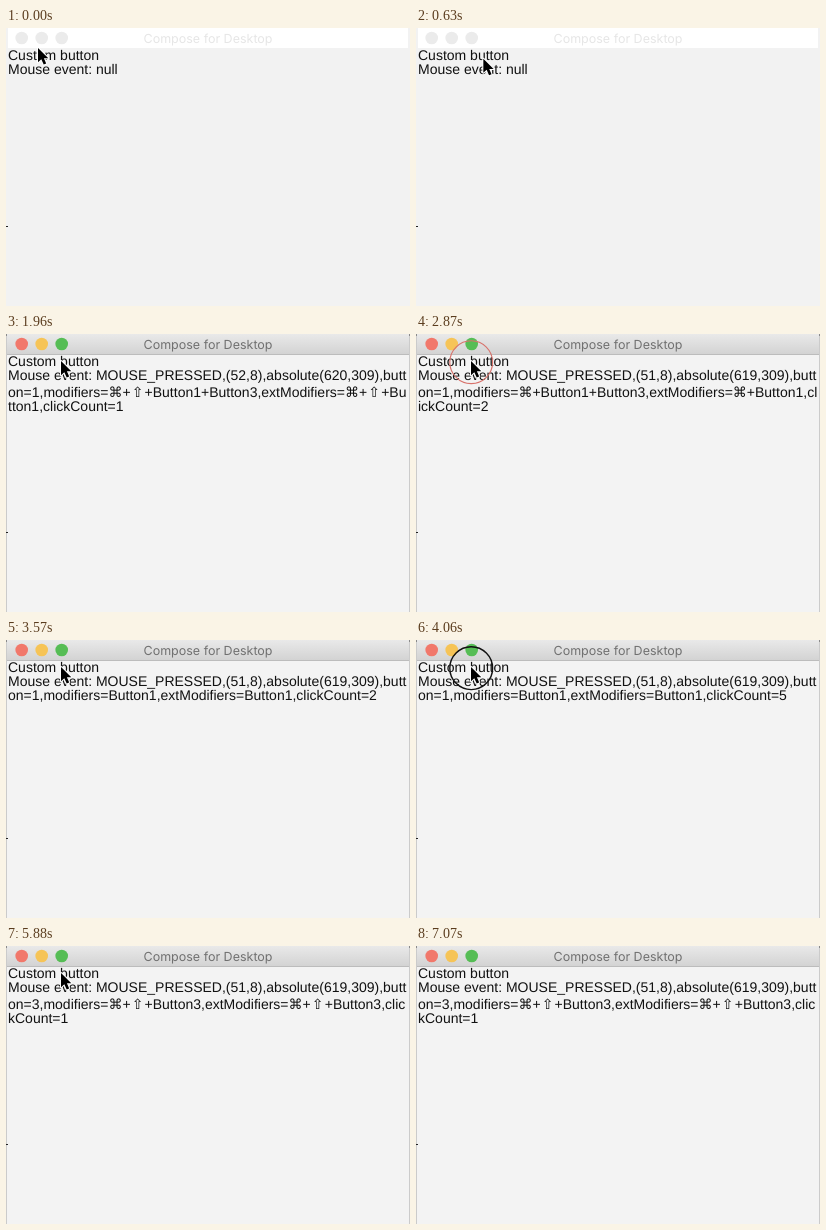
Write an HTML page with a canvas that moves like this. It is 404 by 278 pixels and loops after 7.21 s.

```html
<!DOCTYPE html>
<html lang="en">
<head>
<meta charset="utf-8">
<title>Mouse events</title>
<style>
html, body { margin: 0; width: 100%; height: 100%; overflow: hidden; background: #f2f2f2; }
canvas { display: block; width: 404px; height: 278px; }
</style>
</head>
<body>
<canvas id="stage" width="404" height="278"></canvas>
<script>
const ctx = document.getElementById('stage').getContext('2d');
const LOOP = 7210, TICK = 70;
const ACTIVE = 1120, GONE = 7070;
const BODY = '14px "Liberation Sans", Arial, sans-serif';
const SYMBOL = '14px "DejaVu Sans", sans-serif';
const TITLE = '12.5px Inter, sans-serif';

const press = (x, ...rest) =>
  [`Mouse event: MOUSE_PRESSED,(${x},8),absolute(${x + 568},309),butt`, ...rest];
const plain = n => press(51, `on=1,modifiers=Button1,extModifiers=Button1,clickCount=${n}`);
const command = n => press(51,
  'on=1,modifiers=⌘+Button1+Button3,extModifiers=⌘+Button1,cl', `ickCount=${n}`);

// start time, lines
const messages = [
  [0, ['Mouse event: null']],
  [1890, press(52, 'on=1,modifiers=⌘+⇧+Button1+Button3,extModifiers=⌘+⇧+Bu', 'tton1,clickCount=1')],
  [2380, command(1)],
  [2730, command(2)],
  [3220, plain(1)],
  [3430, plain(2)],
  [3640, plain(3)],
  [3850, plain(4)],
  [3990, plain(5)],
  [5460, press(51, 'on=3,modifiers=⌘+⇧+Button3,extModifiers=⌘+⇧+Button3,clic', 'kCount=1')]
];

// press, release, end
const clicks = [
  [1120, 1260, 1330], [1820, 1890, 1960], [2380, 2520, 2590], [2730, 2870, 2940],
  [3220, 3290, 3360], [3430, 3500, 3570], [3640, 3710, 3780], [3850, 3920, 3920],
  [3990, 4130, 4340], [5460, 5600, 5670]
];

// time, x, y of the pointer tip
const path = [
  [0, 32, 20], [350, 88, 38], [770, 57, 27], [1260, 57, 27], [1820, 55, 27],
  [6720, 55, 27], [6860, 98, 78], [7000, 252, 266], [LOOP, 252, 266]
];

function pointerAt(t) {
  const i = path.findIndex(p => p[0] > t);
  const [t0, x0, y0] = path[i - 1], [t1, x1, y1] = path[i];
  const k = (t - t0) / (t1 - t0);
  return [x0 + (x1 - x0) * k, y0 + (y1 - y0) * k];
}

function disc(x, y, r, fill) {
  ctx.beginPath();
  ctx.arc(x, y, r, 0, Math.PI * 2);
  ctx.fillStyle = fill;
  ctx.fill();
}

function drawWindow(active) {
  ctx.fillStyle = active ? '#f3f3f3' : '#f2f2f2';
  ctx.fillRect(0, 0, 404, 278);
  if (active) {
    const bar = ctx.createLinearGradient(0, 0, 0, 20);
    bar.addColorStop(0, '#e9e9e9');
    bar.addColorStop(1, '#d3d3d3');
    ctx.fillStyle = bar;
    ctx.fillRect(0, 0, 404, 20);
    ctx.fillStyle = '#bcbcbc';
    ctx.fillRect(1, 20, 402, 1);
    ctx.fillStyle = '#cbcbcb';
    ctx.fillRect(0, 0, 1, 278);
    ctx.fillRect(403, 0, 1, 278);
    ctx.fillStyle = '#8a8a8a';
    ctx.fillRect(0, 0, 1, 2);
    ctx.fillRect(403, 0, 1, 2);
  } else {
    ctx.fillStyle = '#fff';
    ctx.fillRect(2, 0, 400, 20);
  }
  const lights = active ? ['#f1786b', '#f6c457', '#56bd55'] : Array(3).fill('#ebebeb');
  lights.forEach((c, i) => disc(15.7 + 20 * i, 10, 6.3, c));
  ctx.fillStyle = '#222';
  ctx.fillRect(0, 198, 2, 1);

  ctx.font = TITLE;
  ctx.textAlign = 'center';
  ctx.fillStyle = active ? '#707070' : '#e6e6e6';
  ctx.fillText('Compose for Desktop', 202, 15);
}

function drawLine(text, x, y) {
  for (const part of text.split(/([⌘⇧])/)) {
    const symbol = part === '⌘' || part === '⇧';
    ctx.font = symbol ? SYMBOL : BODY;
    ctx.textAlign = symbol ? 'center' : 'left';
    ctx.fillText(part, symbol ? x + 7 : x, y);
    x += symbol ? 14 : ctx.measureText(part).width;
  }
}

function drawText(t) {
  const lines = messages.filter(m => m[0] <= t).pop()[1];
  const tall = lines.length > 2;
  ctx.fillStyle = '#111';
  drawLine('Custom button', 2, 32);
  lines.forEach((s, i) => drawLine(s, 2, 46 + i * (tall ? 15.5 : 14) + (tall && i === 1 ? 1 : 0)));
}

function drawRing(t, x, y) {
  const click = clicks.find(c => t >= c[0] && t < c[2]);
  if (!click) return;
  const [down, up] = click;
  const wide = t === down || t >= up + TICK;
  ctx.beginPath();
  ctx.arc(x + 0.2, y + 1.2, wide ? 27 : 21.4, 0, Math.PI * 2);
  ctx.strokeStyle = t < up ? '#111' : '#d8736c';
  ctx.lineWidth = t < up ? 1.4 : 1.1;
  ctx.stroke();
}

const arrow = new Path2D('M0 0V14.2L3.3 11.2L5.7 16.6L8.2 15.5L5.9 10.3H10.3Z');

function drawPointer(x, y) {
  ctx.save();
  ctx.translate(x, y);
  ctx.lineJoin = 'round';
  ctx.strokeStyle = '#fff';
  ctx.lineWidth = 2;
  ctx.stroke(arrow);
  ctx.fillStyle = '#000';
  ctx.fill(arrow);
  ctx.restore();
}

function draw(ms) {
  const t = Math.floor((ms % LOOP) / TICK) * TICK;
  ctx.textRendering = 'geometricPrecision';
  drawWindow(t >= ACTIVE);
  drawText(t);
  if (t < GONE) {
    const [x, y] = pointerAt(t);
    drawRing(t, x, y);
    drawPointer(x, y);
  }
}

const start = performance.now();
function loop(now) {
  draw(Math.max(0, now - start));
  requestAnimationFrame(loop);
}
draw(0);
requestAnimationFrame(loop);
</script>
</body>
</html>
```
